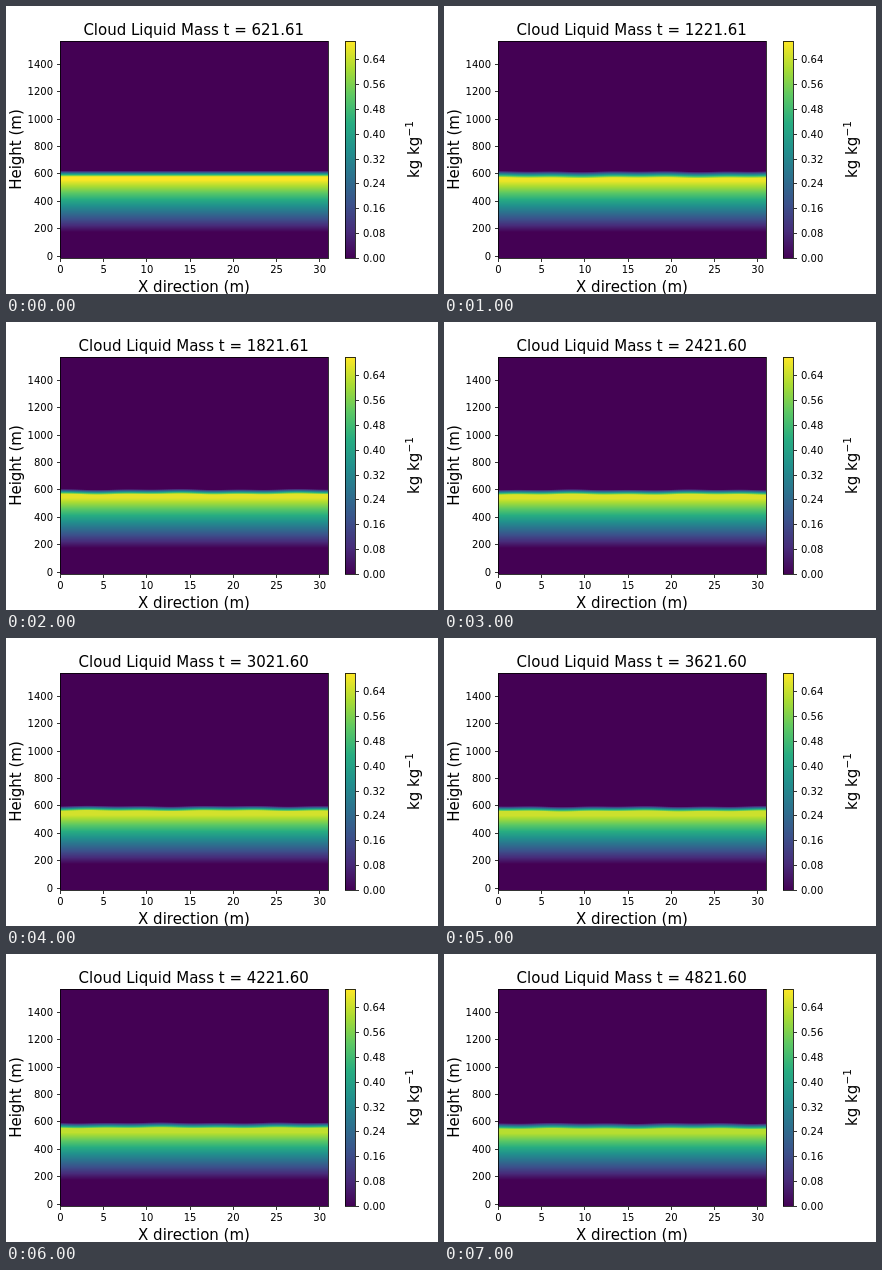
An HTML page with a canvas that plays this animation: 432x288 px, repeating every 8 s.

```html
<!DOCTYPE html>
<html lang="en">
<head>
<meta charset="utf-8">
<title>Cloud Liquid Mass</title>
<style>
  html, body { margin: 0; width: 100%; height: 100%; overflow: hidden; background: #fff; }
  canvas { display: block; }
</style>
</head>
<body>
<canvas id="plot" width="432" height="288"></canvas>
<script>
const ctx = document.getElementById('plot').getContext('2d');
const LEFT = 54, RIGHT = 322, TOP = 35, BOTTOM = 252, MAX = 0.7;
const viridis = [
  [68, 1, 84], [71, 44, 122], [59, 81, 139], [44, 113, 142], [33, 144, 141],
  [39, 173, 129], [92, 200, 99], [170, 220, 50], [253, 231, 37]
];
// Per step: upper edge of the cloud, depth where it is densest, peak value
const steps = [
  [164.7, 170.8, 0.7], [165.2, 172, 0.682], [167.2, 172.4, 0.672], [167.5, 172.7, 0.664],
  [167.9, 173, 0.656], [168.2, 173.4, 0.648], [168.6, 174.2, 0.636], [169, 175, 0.625]
];

function colour(value) {
  const p = Math.max(0, Math.min(1, value / MAX)) * 8;
  const i = Math.min(7, Math.floor(p));
  const rgb = viridis[i].map((c, k) => Math.round(c + (viridis[i + 1][k] - c) * (p - i)));
  return `rgb(${rgb})`;
}

function text(str, x, y, size = 10, align = 'center', turn = 0) {
  ctx.save();
  ctx.translate(x, y);
  ctx.rotate(turn);
  ctx.font = `${size}px "DejaVu Sans", sans-serif`;
  ctx.textAlign = align;
  ctx.fillStyle = '#000';
  ctx.fillText(str, 0, 0);
  ctx.restore();
}

function line(x, y, w, h) {
  ctx.fillStyle = 'rgba(0,0,0,.8)';
  ctx.fillRect(Math.round(x), Math.round(y), w, h);
}

function frame(x, y, w, h) {
  ctx.strokeStyle = 'rgba(0,0,0,.8)';
  ctx.lineWidth = 1;
  ctx.strokeRect(x + 0.5, y + 0.5, w, h);
}

function drawCloud(step) {
  const [edge, peakY, peak] = steps[step];
  ctx.fillStyle = colour(0);
  ctx.fillRect(LEFT, TOP, RIGHT - LEFT, BOTTOM - TOP);
  const ripple = step ? 0.25 : 0;
  for (let x = LEFT; x < RIGHT; x += 2) {
    const shift = ripple * (Math.sin(x * 0.047 + step * 1.7) + Math.sin(x * 0.11 - step));
    for (let y = 162; y < 227; y++) {
      const rise = Math.max(0, Math.min(1, (y + 0.5 - edge - shift) / (peakY - edge)));
      const body = Math.max(0, (225.5 - y) * 0.0134);
      ctx.fillStyle = colour(Math.min(peak * rise, body));
      ctx.fillRect(x, y, 2, 1);
    }
  }
}

function drawAxes() {
  for (let y = TOP; y < BOTTOM; y++) {
    ctx.fillStyle = colour((BOTTOM - y) / (BOTTOM - TOP) * MAX);
    ctx.fillRect(339, y, 10, 1);
  }
  frame(LEFT, TOP, RIGHT - LEFT, BOTTOM - TOP);
  frame(339, TOP, 10, BOTTOM - TOP);

  for (let v = 0; v <= 30; v += 5) {
    const x = LEFT + v * 8.64;
    line(x, BOTTOM + 1, 1, 3);
    text(v, x + 0.5, 267);
  }
  for (let v = 0; v <= 1400; v += 200) {
    const y = 249.7 - v * 0.1371;
    line(LEFT - 3, y, 3, 1);
    text(v, 47, Math.round(y + 4), 10, 'right');
  }
  for (let i = 0; i <= 8; i++) {
    const y = BOTTOM - i * 24.87;
    line(350, y, 3, 1);
    text((i * 0.08).toFixed(2), 357, Math.round(y + 4), 10, 'left');
  }
  text('X direction (m)', 188, 286, 15);
  text('Height (m)', 15, 143.5, 15, 'center', -Math.PI / 2);
  text('kg kg', 413, 172, 15, 'left', -Math.PI / 2);
  text('−1', 407, 130.5, 10.5, 'left', -Math.PI / 2);
}

let shown = -1;
function tick() {
  const step = Math.floor(performance.now() / 1000) % 8;
  if (step !== shown) {
    shown = step;
    ctx.fillStyle = '#fff';
    ctx.fillRect(0, 0, 432, 288);
    drawCloud(step);
    drawAxes();
    const time = 621.61 + 600 * step - (step > 2 ? 0.01 : 0);
    text(`Cloud Liquid Mass t = ${time.toFixed(2)}`, 187.7, 29, 15);
  }
  requestAnimationFrame(tick);
}
tick();
</script>
</body>
</html>
```
